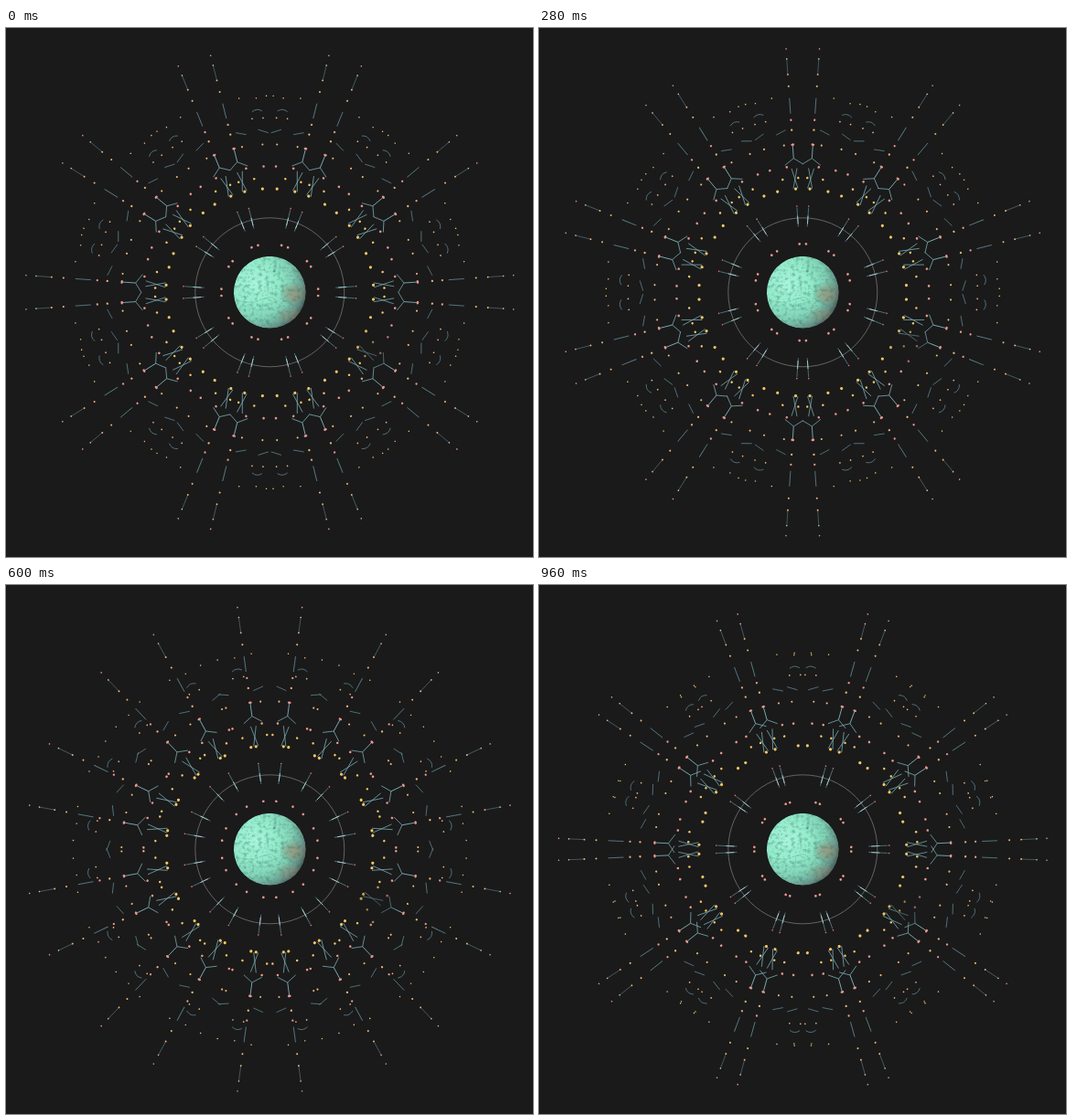
An HTML page that plays this animation: 576x579 px, repeating every 1 s.

```html
<!DOCTYPE html>
<html lang="en">
<head>
<meta charset="utf-8">
<title>Orbiting lattice</title>
<style>
  html, body { margin: 0; width: 100%; height: 100%; overflow: hidden; background: #1a1a1a; }
  svg { display: block; width: 100vw; height: 100vh; }
</style>
</head>
<body>
<svg viewBox="0 0 576 579" xmlns="http://www.w3.org/2000/svg">
  <defs>
    <g id="sector"></g>
    <radialGradient id="globe" cx="0.3" cy="0.37" r="0.76">
      <stop offset="0" stop-color="#a8f6dc"/>
      <stop offset="0.4" stop-color="#93ebcb"/>
      <stop offset="0.68" stop-color="#80cfb4"/>
      <stop offset="0.87" stop-color="#67948a"/>
      <stop offset="1" stop-color="#454a48"/>
    </radialGradient>
    <radialGradient id="rust">
      <stop offset="0" stop-color="#a48c70" stop-opacity="0.7"/>
      <stop offset="0.5" stop-color="#958069" stop-opacity="0.45"/>
      <stop offset="1" stop-color="#8a7862" stop-opacity="0"/>
    </radialGradient>
    <radialGradient id="shade">
      <stop offset="0" stop-color="#1a1a1a" stop-opacity="0.5"/>
      <stop offset="0.6" stop-color="#1a1a1a" stop-opacity="0.35"/>
      <stop offset="1" stop-color="#1a1a1a" stop-opacity="0"/>
    </radialGradient>
    <filter id="grain" x="0" y="0" width="1" height="1" color-interpolation-filters="sRGB">
      <feTurbulence type="fractalNoise" baseFrequency="0.24" numOctaves="4" seed="8"/>
      <feColorMatrix values="0 0 0 0 0.2  0 0 0 0 0.46  0 0 0 0 0.4  2.4 0 0 0 -1.1"/>
      <feComposite in2="SourceGraphic" operator="in"/>
    </filter>
    <clipPath id="disc"><circle r="39.5"/></clipPath>
  </defs>
  <rect width="576" height="579" fill="#1a1a1a"/>
  <g transform="translate(288.3 289.3)">
    <circle r="81.5" fill="none" stroke="#777" stroke-width="0.8"/>
    <g id="left"></g>
    <g id="right"></g>
    <circle cx="117" cy="61" r="26" fill="url(#shade)"/>
    <g clip-path="url(#disc)">
      <circle r="39.5" fill="url(#globe)"/>
      <ellipse cx="26" cy="2" rx="15" ry="13" fill="url(#rust)"/>
      <ellipse cx="22" cy="25" rx="17" ry="10" fill="url(#rust)" opacity="0.6"/>
      <circle r="39.5" filter="url(#grain)" opacity="0.5"/>
      <path d="M-33 9Q-20 13-8 7T10 13T25 8M-8 7Q-6 19-12 28M6-6Q14-2 19 8T18 26"
        fill="none" stroke="#5ba692" stroke-width="0.5" opacity="0.6"/>
      <path d="M-32 8Q-20 12-8 6T10 12" fill="none" stroke="#b8f5df" stroke-width="0.7" opacity="0.7"/>
      <circle cx="5" cy="-23" r="1.2" fill="#5a9f8f"/>
    </g>
  </g>
</svg>
<script>
const NS = 'http://www.w3.org/2000/svg';
const PINK = '#ec978e', GOLD = '#f3c768', AMBER = '#f0b67a', TEAL = '#7fb3bb', SLATE = '#587c86';
const STEP = 40, LOOP = 1000, FOLD = 36, START = 14;
const sector = document.getElementById('sector');

function add(parent, tag, attrs) {
  const el = document.createElementNS(NS, tag);
  for (const key in attrs) el.setAttribute(key, attrs[key]);
  return parent.appendChild(el);
}

// Point at radius r, deg clockwise from the spoke, moved dx sideways
function at(r, deg = 0, dx = 0) {
  const a = deg * Math.PI / 180, s = Math.sin(a), c = Math.cos(a);
  return [r * s + dx * c, -r * c + dx * s];
}

function dot(r, deg, size, fill) {
  const [cx, cy] = at(r, deg);
  add(sector, 'circle', { cx, cy, r: size, fill });
}

function pair(r, deg, size, fill) {
  dot(r, deg, size, fill);
  dot(r, -deg, size, fill);
}

function line(from, to, stroke, width) {
  add(sector, 'path', { d: `M${from}L${to}`, stroke, 'stroke-width': width, fill: 'none' });
}

function drawSector() {
  // Needle crossing the ring
  line(at(72), at(93), SLATE, 0.8);
  line(at(75), at(84), '#a9d0cf', 0.9);
  dot(53, 0, 1.35, PINK);
  dot(94.5, 0, 0.85, '#d9716c');

  // Crossed legs, forked stem and slanted dashes
  for (const side of [-1, 1]) {
    line(at(114, 0, -2.5 * side), at(136, 0, 3 * side), TEAL, 0.7);
    line(at(147), at(140, 0, 10 * side), TEAL, 0.7);
    line(at(178.5, 11.7 * side, -5.5 * side), at(174.5, 11.7 * side, 5.5 * side), SLATE, 0.8);
  }
  line(at(147), at(161), TEAL, 0.85);

  // Long spoke
  line(at(196), at(213), SLATE, 0.9);
  line(at(239), at(256), SLATE, 0.6);
  add(sector, 'ellipse', { cx: 0, cy: -162, rx: 1.9, ry: 1.3, fill: PINK });
  dot(178, 0, 1.15, AMBER);
  dot(189, 0, 1.15, PINK);
  dot(226, 0, 1, AMBER);
  dot(239, 0, 0.95, AMBER);
  dot(256, 0, 0.8, '#d8c0b4');
  dot(267, 0, 0.8, PINK);

  // Surrounding dots
  dot(113.5, 0, 1.6, GOLD);
  dot(113.5, 18, 1.6, GOLD);
  pair(125.3, 6.2, 1.25, GOLD);
  pair(138, 11.2, 1.3, PINK);
  pair(162, 11.2, 1.05, AMBER);
  dot(191, 16.2, 0.85, AMBER);
  dot(191, 19.8, 0.85, AMBER);
  dot(213, 18, 0.75, AMBER);
  dot(215, 13, 0.75, GOLD);
  dot(215, 23, 0.75, GOLD);
  add(sector, 'path', {
    d: `M${at(198.5, 18, -5.5)}Q${at(202.5, 18)} ${at(198.5, 18, 5.5)}`,
    stroke: SLATE, 'stroke-width': 0.8, fill: 'none'
  });
}

function ring(id) {
  const group = document.getElementById(id);
  for (let k = 0; k < 10; k++)
    add(group, 'use', { href: '#sector', transform: `rotate(${k * FOLD})` });
  return group;
}

drawSector();
const left = ring('left'), right = ring('right');

function render(now) {
  const t = Math.floor((now % LOOP) / STEP) * STEP;
  const angle = START - FOLD * t / LOOP;
  left.setAttribute('transform', `rotate(${angle})`);
  right.setAttribute('transform', `rotate(${-angle})`);
}

let begin;
function tick(now) {
  begin ??= now;
  render(now - begin);
  requestAnimationFrame(tick);
}
render(0);
requestAnimationFrame(tick);
</script>
</body>
</html>
```
